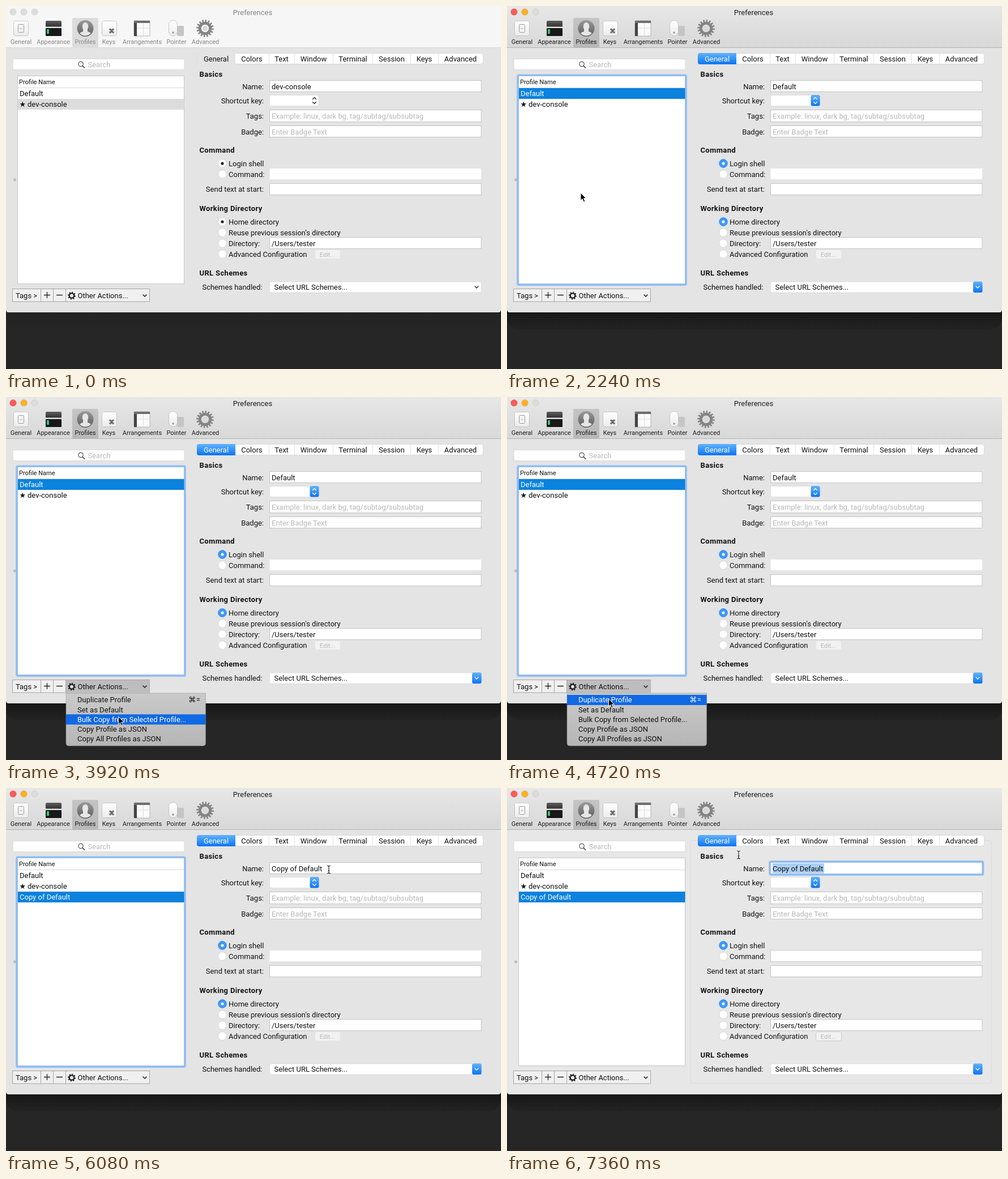
These frames come from a looping animation (874x641 px, 8 s). An HTML page:

```html
<!DOCTYPE html>
<html lang="en">
<head>
<meta charset="utf-8">
<title>Preferences</title>
<style>
html, body { margin: 0; width: 100%; height: 100%; overflow: hidden; background: #262626; }
svg { display: block; width: 100%; height: 100%; }
text { font: 13px Roboto, "Liberation Sans", sans-serif; fill: #111; white-space: pre; }
.small { font-size: 11px; }
.head { font-weight: 700; letter-spacing: .36px; }
.hint { fill: #b8b8b8; }
.sym { font-family: "DejaVu Sans", sans-serif; }
.line { fill: none; stroke: #222; stroke-width: 1.3; stroke-linecap: round; stroke-linejoin: round; }
.field { fill: #fff; stroke: #c3c3c3; }
.pop { fill: #fff; stroke: #d2d2d2; stroke-width: .6; }
.ring { fill: none; stroke: #8fbdf5; stroke-width: 3.6; }

.body { fill: #e4e4e4; }
.bar { fill: #f6f6f6; }
.barline { fill: #dadada; }
.bar-text { fill: #868686; }
.picked { fill: #dcdcdc; }
.light { fill: #dcdcdc; stroke: #cbcbcb; stroke-width: .7; }
.accent { fill: none; }
.dot { fill: #222; }
.row { fill: #dcdcdc; }
.shade { opacity: .15; }
.on .bar { fill: url(#bar-fill); }
.on .barline { fill: #b4b4b4; }
.on .bar-text { fill: #1c1c1c; }
.on .picked { fill: url(#picked-fill); }
.on .red { fill: #fc5b57; stroke: #e04743; }
.on .amber { fill: #fdb124; stroke: #dd9b25; }
.on .accent { fill: url(#blue-fill); }
.on .radio { fill: #3b99fc; stroke: #2a84e8; }
.on .dot, .on .onwhite { fill: #fff; }
.on .chev { stroke: #fff; }
.on .row { fill: #0a82de; }
.on .shade { opacity: 1; }
.on text.chosen { fill: #fff; }
.edges { display: none; fill: none; stroke: #c9c9c9; }
.editing .edges { display: block; }
.editing .body { fill: #e7e7e7; }
</style>
</head>
<body>
<script>
const LOOP = 8000, STEP = 80;
const text = (x, cy, s, cls = '', anchor = 'start') =>
  `<text x="${x}" y="${cy + (cls.includes('small') ? 4 : 4.5)}" class="${cls}" text-anchor="${anchor}">${s}</text>`;
const box = (x, y, w, h, attrs = '', r = 0) =>
  `<rect x="${x}" y="${y}" width="${w}" height="${h}" rx="${r}" ${attrs}/>`;
const circle = (x, y, r, attrs = '') => `<circle cx="${x}" cy="${y}" r="${r}" ${attrs}/>`;
const path = (d, attrs = 'class="line"') => `<path d="${d}" ${attrs}/>`;
const fade = (name, top, bottom) => `<linearGradient id="${name}-fill" x2="0" y2="1">
  <stop stop-color="${top}"/><stop offset="1" stop-color="${bottom}"/></linearGradient>`;
const field = (y, h = 20) => box(465.5, y + .5, 373.5, h, 'class="field"');
const gear = (x, y, r, teeth, color, hole) =>
  circle(x, y, r * .88, `fill="none" stroke="${color}" stroke-width="${r * .28}" pathLength="${teeth * 2}" stroke-dasharray="1"`) +
  circle(x, y, r * .62, `fill="none" stroke="${color}" stroke-width="${r * .34}"`) +
  circle(x, y, r * .3, `fill="${hole}"`);

const defs = `<defs>${fade('bar', '#e7e7e7', '#d8d8d8')}${fade('picked', '#c4c4c4', '#b8b8b8')}
  ${fade('blue', '#62b2fb', '#0a74f6')}${fade('shade', '#151515', '#232323')}${fade('tile', '#fff', '#ececec')}
  ${fade('badge', '#9a9a9a', '#5c5c5c')}${fade('menu', '#cacaca', '#b6b6b6')}${fade('screen', '#606060', '#2a2a2a')}
  <clipPath id="disc">${circle(140, 39.5, 13)}</clipPath></defs>`;

function toolbar() {
  const tile = 'fill="url(#tile-fill)" stroke="#b9b9b9" stroke-width=".8"';
  const labels = [['General', 26.5], ['Appearance', 83.5], ['Profiles', 140], ['Keys', 181.5],
    ['Arrangements', 240.5], ['Pointer', 301], ['Advanced', 352]];
  return box(0, 0, 874, 73, 'class="bar"') + box(0, 73, 874, 1, 'class="barline"') +
    box(117, 21, 46, 52, 'class="picked"', 2) +
    circle(12.5, 10.5, 5.6, 'class="light red"') + circle(31.5, 10.5, 5.6, 'class="light amber"') +
    circle(50.5, 10.5, 5.6, 'class="light"') +
    text(435.5, 11, 'Preferences', 'bar-text', 'middle') +
    labels.map(([s, x]) => text(x, 63, s, 'small bar-text', 'middle')).join('') +
    box(13.5, 26.5, 26, 26, tile, 3) + box(21.5, 32.5, 10, 14, 'fill="#f4f4f4" stroke="#999"', 1) +
    path('M24 40h5', 'stroke="#aaa"') +
    box(70, 26, 28, 12, 'fill="url(#screen-fill)"', 2) + box(70, 36.5, 28, 2.5, 'fill="#e2e2e2"') +
    box(70, 39, 28, 14, 'fill="#181818"', 1) + box(72, 41, 4, 8, 'fill="#35c46c"') +
    circle(140, 39.5, 14.5, 'fill="url(#badge-fill)"') +
    `<g clip-path="url(#disc)" fill="#e6e6e6"><ellipse cx="140" cy="36" rx="5.3" ry="7"/>` +
    path('M127 54q1-7 9-9v-4h8v4q8 2 9 9z', '') + '</g>' +
    box(169.5, 26.5, 26, 26, tile, 3) + text(186.5, 43.5, '⌘', 'small sym', 'middle') +
    box(226, 26, 28, 27, 'fill="#fafafa" stroke="#999" stroke-width=".7"', 1) +
    box(226, 26, 28, 4, 'fill="#6d6d6d"') + box(226, 30, 5, 23, 'fill="#444"') +
    path('M231 39h23M242.5 30v23', 'stroke="#ddd" fill="none"') +
    box(302, 35, 12, 18, 'fill="#c5c5c5"', 2) + box(287.5, 25.5, 15, 27, tile, 7) +
    circle(295, 47, 1.8, 'fill="#999"') +
    gear(351.5, 39.5, 15, 16, '#858585', '#d8d8d8');
}

function sidebar() {
  return box(12, 93.5, 303, 19, 'fill="#fff" stroke="#d0d0d0" stroke-width=".7"', 3) +
    circle(132, 102.5, 4.2, 'fill="none" stroke="#555" stroke-width="1.2"') + path('M135.2 105.8l3.6 3.6') +
    text(144.5, 103.5, 'Search', 'hint') +
    box(20.5, 123.5, 294, 367, 'fill="#fff" stroke="#c6c6c6"') +
    box(19, 122.3, 297, 370, 'class="ring" id="listRing"', 2) +
    text(23, 133.5, 'Profile Name', 'small') + box(21, 144, 293, 1, 'fill="#d8d8d8"') +
    box(21, 164, 293.5, 19, 'class="row" id="row"') +
    `<g class="item">${text(24, 154.5, 'Default')}</g>` +
    `<g class="item">${text(23.5, 173.5, '★', 'sym')}${text(38, 173.5, 'dev-console')}</g>` +
    `<g class="item">${text(24, 192.5, 'Copy of Default')}</g>` +
    circle(15.5, 307, 2, 'fill="#c8c8c8" stroke="#a0a0a0" stroke-width=".8"') +
    box(11.5, 499.5, 242, 22.5, 'fill="#f0f0f0" stroke="#a3a3a3"') +
    box(106, 500, 147.5, 21.5, 'fill="#bdbdbd" id="pressed"') +
    path('M61.5 500v22M83.5 500v22M105.5 500v22', 'stroke="#a3a3a3"') +
    text(17, 511.5, 'Tags &gt;') + path('M67.5 510.5h10M72.5 505.5v10M89.5 510.5h10') +
    gear(116, 511.5, 6.8, 8, '#222', '#eee') + text(126.5, 511.5, 'Other Actions...') +
    path('M242 510l3 3 3-3', 'class="line" style="stroke-width:1.6"');
}

function form() {
  const tabs = [['Colors', 434], ['Text', 486.5], ['Window', 543], ['Terminal', 612.5],
    ['Session', 681], ['Keys', 738.5], ['Advanced', 802.5]];
  const labels = [['Name:', 142], ['Shortcut key:', 167], ['Tags:', 194], ['Badge:', 222], ['Send text at start:', 323]];
  const radios = [['Login shell', 278, 1], ['Command:', 297], ['Home directory', 381, 1],
    ["Reuse previous session's directory", 400], ['Directory:', 419], ['Advanced Configuration', 438]];
  const heads = [['Basics', 120], ['Command', 254.5], ['Working Directory', 357], ['URL Schemes', 471.5]];
  const firstTab = 'M405 83h-64q-4 0-4 4v12q0 4 4 4h64z';
  return `<g class="edges">${box(323.5, 92.5, 532, 429, 'stroke="#dadada"', 4)}</g>` +
    box(337, 83.5, 505.5, 19, 'fill="#fff" stroke="#cfcfcf" stroke-width=".7"', 4) +
    path(firstTab, 'fill="#e4e4e4"') + path(firstTab, 'class="accent"') +
    path('M464.5 84v18M509.5 84v18M577.5 84v18M647.5 84v18M714.5 84v18M763.5 84v18', 'stroke="#e2e2e2"') +
    text(371, 93, 'General', 'onwhite', 'middle') +
    tabs.map(([s, x]) => text(x, 93, s, '', 'middle')).join('') +
    heads.map(([s, y]) => text(341.5, y, s, 'head')).join('') +
    labels.map(([s, y]) => text(455, y, s, '', 'end')).join('') +
    text(452.5, 496.5, 'Schemes handled:', '', 'end') +
    [131, 183, 211, 313, 408].map(y => field(y, y === 183 ? 21 : 20)).join('') +
    box(465.5, 287, 373.5, 19, 'fill="#fff"') +
    `<g class="edges">${box(465.5, 286.5, 373.5, 20)}${box(545.5, 430.5, 45, 16, '', 3)}</g>` +
    `<g id="focus">${box(464, 130, 376.5, 23, 'class="ring"', 2)}</g>` +
    box(469, 133, 91, 17.5, 'fill="#aacff3" id="marked"') +
    text(469, 142.5, '', 'name') +
    text(469, 194, 'Example: linux, dark bg, tag/subtag/subsubtag', 'hint') +
    text(469, 222, 'Enter Badge Text', 'hint') + text(469, 419, '/Users/tester') +
    box(465.5, 157.5, 86.5, 19, 'class="pop"', 3) + box(536.5, 157, 16, 19.5, 'class="accent"', 3) +
    path('M541.5 164.5l3-3 3 3M541.5 169.5l3 3 3-3', 'class="line chev"') +
    box(465.5, 487, 373.5, 19, 'class="pop"', 3) + box(823, 486.5, 16.5, 19.5, 'class="accent"', 3) +
    path('M828 495l3 3 3-3', 'class="line chev"') + text(473.5, 496.5, 'Select URL Schemes...') +
    radios.map(([s, y, set]) =>
      circle(382, y, 7.4, `fill="#fff" stroke="#c8c8c8" stroke-width=".7" class="${set ? 'radio' : ''}"`) +
      (set ? circle(382, y, 2.6, 'class="dot"') : '') + text(393, y + .5, s)).join('') +
    box(546, 431, 44, 15, 'fill="#f2f2f2"', 3) + text(567.5, 439, 'Edit...', 'small hint', 'middle');
}

const actions = ['Duplicate Profile', 'Set as Default', 'Bulk Copy from Selected Profile...',
  'Copy Profile as JSON', 'Copy All Profiles as JSON'];
const rowY = i => 534.8 + i * 17.2;
const menu = `<g id="menu">` +
  path('M106 523h246.5v88q0 5-5 5h-236.500q-5 0-5-5z', 'fill="url(#menu-fill)" stroke="#8d8d8d" stroke-width=".5"') +
  box(106, 526, 246.5, 18, 'fill="#1069e5" id="hover"') +
  actions.map((s, i) => `<g class="action">${text(126, rowY(i), s)}${i ? '' :
    text(335, rowY(0), '⌘', 'sym', 'end') + text(343, rowY(0), '=', '', 'end')}</g>`).join('') + '</g>';

const pointer = `<g id="pointer">
  ${circle(3, 6.5, 15.5, 'id="press" fill="#fff" fill-opacity=".5" stroke="#222" stroke-width="1.3"')}
  <g id="arrow">${path('M0 0v13.500l3.100-2.900 2.300 5.300 2.400-1-2.300-5.200h4.300z', 'fill="#000" stroke="#fff" stroke-width="1"')}</g>
  <g id="beam">${['#fff', '#222'].map((c, i) =>
    path('M-3-7q3 0 3 2q0-2 3-2M0-5v10M-3 7q3 0 3-2q0 2 3 2M-1.500 2h3',
      `fill="none" stroke="${c}" stroke-width="${i ? 1.2 : 2.6}"`)).join('')}</g></g>`;

document.body.innerHTML = `<svg viewBox="0 0 874 641" preserveAspectRatio="none">${defs}
  ${box(0, 0, 874, 641, 'fill="#262626"')}
  ${path('M0 535h874v18q-4 18-24 18h-826q-20 0-24-18z', 'fill="url(#shade-fill)" class="shade"')}
  ${path('M0 0h874v536q0 5-5 5h-864q-5 0-5-5z', 'class="body"')}
  ${toolbar()}${sidebar()}${form()}${menu}${pointer}</svg>`;

const svg = document.querySelector('svg');
const $ = id => document.getElementById(id);
const items = [...document.querySelectorAll('.item')];
const choices = [...document.querySelectorAll('.action')];
const nameText = document.querySelector('.name');

// time, x, y of the pointer tip
const route = [
  [240, 169, 443], [320, 115, 424], [480, 110, 408], [1280, 62, 151], [1840, 62, 151],
  [2240, 130, 330], [2400, 155, 395], [2560, 222, 525], [2800, 222, 525], [2960, 228, 511],
  [3520, 228, 511], [3840, 200, 567], [4320, 179.5, 533], [4720, 179.5, 533],
  [5040, 139, 354], [5280, 180, 322], [5440, 284, 246], [5600, 320, 228], [6080, 570, 144],
  [6880, 550, 147], [7200, 414, 150], [7360, 409, 118]
];
const rests = [[320, 480], [2240, 2400], [2560, 2800], [5040, 5280], [5440, 5600], [6080, 6880], [7200, 7360]];
const presses = [[1600, 1840], [2960, 3200], [4560, 4720], [6240, 6400], [6480, 6640]];
const within = (t, spans) => spans.some(([a, b]) => t >= a && t < b);

function pointerAt(t) {
  const next = route.findIndex(p => p[0] > t);
  if (next < 1) return route[next < 0 ? route.length - 1 : 0].slice(1);
  const a = route[next - 1], b = route[next];
  if (within(t, rests)) return a.slice(1);
  const u = (t - a[0]) / (b[0] - a[0]), e = u * u * (3 - 2 * u);
  return [a[1] + (b[1] - a[1]) * e, a[2] + (b[2] - a[2]) * e];
}
const show = (id, visible) => { $(id).style.display = visible ? '' : 'none'; };

function draw(t) {
  const [x, y] = pointerAt(t);
  const active = t >= 1360, editing = t >= 6320;
  const selected = t < 1680 ? 1 : t < 4800 ? 0 : 2;
  const open = t >= 3040 && t < 4800;
  const hovered = open && y >= 526 ? Math.floor((y - 526) / 17.2) : -1;
  const beam = t >= 6000;

  svg.classList.toggle('on', active);
  svg.classList.toggle('editing', editing);
  show('listRing', active && !editing);
  show('focus', editing);
  show('marked', t >= 6560);
  $('row').setAttribute('y', 145 + selected * 19);
  items.forEach((g, i) => {
    g.style.display = i === 2 && t < 4800 ? 'none' : '';
    g.querySelectorAll('text').forEach(el => el.classList.toggle('chosen', i === selected));
  });
  nameText.textContent = ['Default', 'dev-console', 'Copy of Default'][selected];

  show('menu', open);
  show('pressed', t >= 3200 && t < 4800);
  show('hover', hovered >= 0);
  $('hover').setAttribute('y', 526 + Math.max(hovered, 0) * 17.2);
  choices.forEach((g, i) => g.querySelectorAll('text').forEach(el => el.classList.toggle('chosen', i === hovered)));

  show('pointer', t >= 240);
  show('arrow', !beam);
  show('beam', beam);
  show('press', within(t, presses));
  $('press').setAttribute('transform', beam ? 'translate(-3 -6.5)' : '');
  $('pointer').setAttribute('transform', `translate(${x} ${y})`);
}

const start = performance.now();
function tick() {
  const t = (performance.now() - start) % LOOP;
  draw(Math.floor(t / STEP) * STEP);
  requestAnimationFrame(tick);
}
tick();
</script>
</body>
</html>
```
